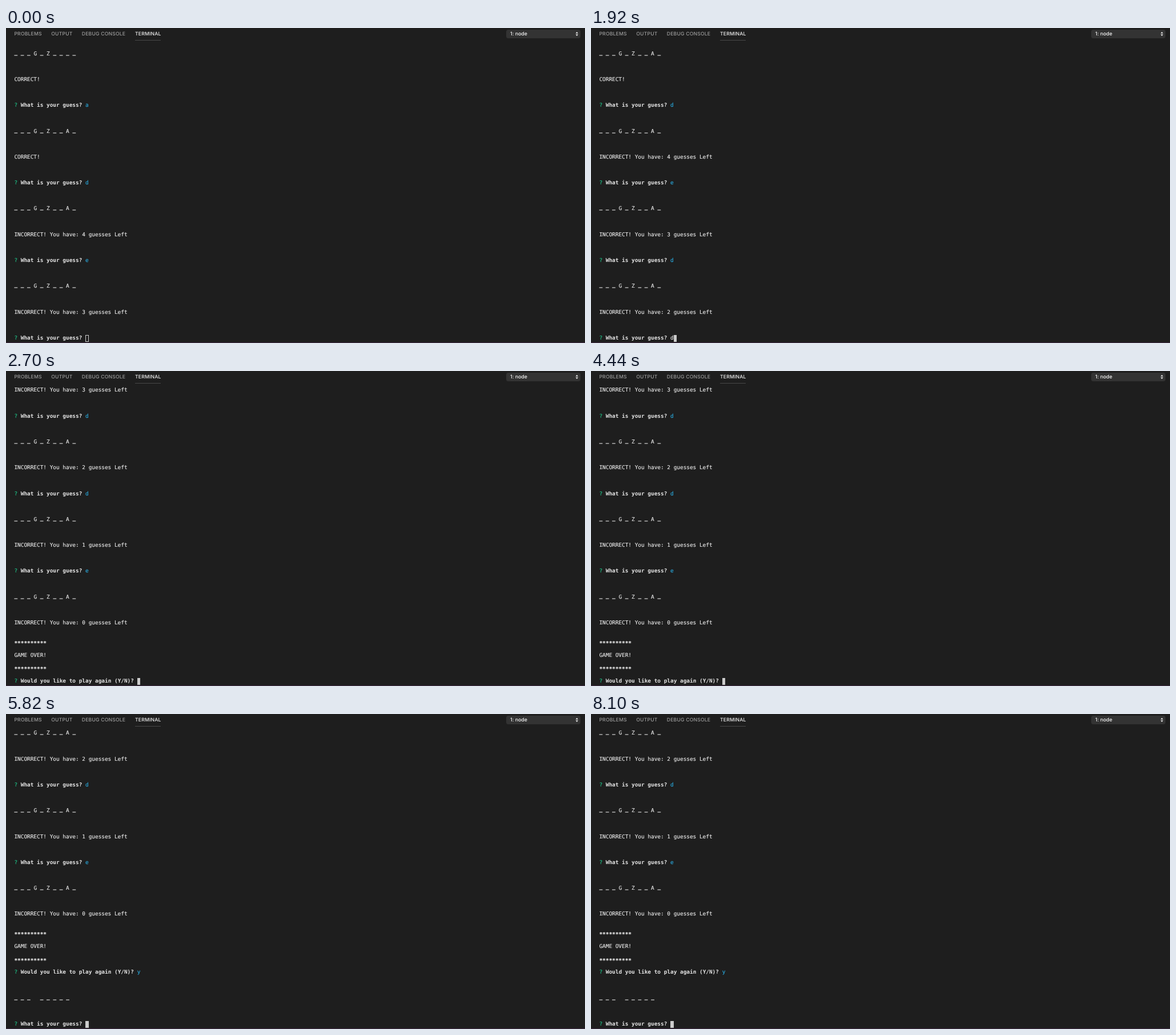
These frames come from a looping animation (1014x552 px, 8280 ms). An HTML page:

```html
<!DOCTYPE html>
<html lang="en">
<head>
<meta charset="utf-8">
<title>Terminal word game</title>
<style>
  html, body { margin: 0; width: 100%; height: 100%; overflow: hidden; background: #1e1e1e; }
  body { position: relative; text-rendering: geometricPrecision; }
  nav span, .select, .select svg, .screen, .log, .edge { position: absolute; }
  nav span, .select { font: 500 8.64px/15px Inter, "Open Sans", sans-serif; white-space: pre; }
  nav span { top: 4px; letter-spacing: .19px; color: #9c9c9c; }
  nav .active { color: #f2f2f2; }
  nav .active::after {
    content: ""; position: absolute; left: 0; top: 17px; width: 45px; height: 1px; background: #484848;
  }
  .select {
    left: 876px; top: 3px; width: 123px; height: 15px; padding-left: 7px;
    border-radius: 3.5px; background: #333; color: #f8f8f8; font-size: 8.8px;
  }
  .select svg { left: 121px; top: 3px; fill: #f0f0f0; }
  .screen { left: 14.4px; top: 28px; width: 990px; height: 522px; overflow: hidden; }
  .log {
    left: 0; bottom: .67px; white-space: pre; color: #eaeaea;
    font: 9.42px/11.3333px "DejaVu Sans Mono", "Liberation Mono", monospace;
    -webkit-text-stroke: .15px;
  }
  .log b { color: #e5e5e5; -webkit-text-stroke: 0; }
  .log i { font-style: normal; color: #1fc488; }
  .log u { text-decoration: none; color: #2aabe0; }
  .log em { position: relative; font-style: normal; }
  .log .blank { top: -2px; text-shadow: 0 0, 0 0; }
  .log .stars { top: 2px; font-weight: bold; }
  .cursor { position: absolute; box-sizing: border-box; width: 5.67px; height: 12px; background: #ccc; }
  .cursor.hollow { background: none; border: 1px solid #ccc; }
  .edge { left: 0; top: 551px; width: 100%; height: 1px; background: #3d2740; }
</style>
</head>
<body>
<nav>
  <span style="left:14.4px">PROBLEMS</span>
  <span style="left:79.3px">OUTPUT</span>
  <span style="left:132.8px">DEBUG CONSOLE</span>
  <span class="active" style="left:226px">TERMINAL</span>
</nav>
<div class="select">1: node<svg width="6" height="9"><path d="M.5 3.6 2.8 .8 5.1 3.6zM.5 5.2 2.8 8 5.1 5.2z"/></svg></div>
<div class="screen"><div class="log"></div></div>
<div class="edge"></div>
<script>
const LOOP = 8280;
const GAP = "\n\n\n\n";

const word = s => s.replaceAll("_", '<em class="blank">_</em>');
const wrong = n => `INCORRECT! You have: ${n} guesses Left`;
const ask = (question, answer) => `<i>?</i> <b>${question}</b> ${answer}`;
const entered = s => `<u>${s}</u>`;
const typing = (s = "", style = "") => `${s}<span class="cursor ${style}"></span>`;
const guess = answer => ask("What is your guess?", answer);
const again = answer => ask("Would you like to play again (Y/N)?", answer);

const known = word("_ _ _ G _ Z _ _ A _");
const miss = (letter, left) => [guess(entered(letter)), known, wrong(left)];
const stars = `<em class="stars">${"*".repeat(10)}</em>`;

const start = [
  word("_ _ _ G _ Z _ _ _ _"), "CORRECT!",
  guess(entered("a")), known, "CORRECT!",
  ...miss("d", 4), ...miss("e", 3)
];
const two = [...start, ...miss("d", 2)];
const one = [...two, ...miss("d", 1)];
const lost = [...one, ...miss("e", 0)].join(GAP) +
  `\n\n\n${stars}\n\nGAME OVER!\n\n${stars}\n\n`;

const show = (lines, prompt) => [...lines, prompt].join(GAP);

// Start time and contents of each terminal state
const states = [
  [0, show(start, guess(typing("", "hollow")))],
  [60, show(start, guess(typing()))],
  [900, show(start, guess(typing("d")))],
  [1020, show(two, guess(typing()))],
  [1860, show(two, guess(typing("d")))],
  [1980, show(one, guess(typing()))],
  [2580, show(one, guess(typing("e")))],
  [2700, lost + again(typing())],
  [4620, lost + again(typing("y"))],
  [5820, show([lost + again(entered("y")), word("_ _ _   _ _ _ _ _")], guess(typing()))]
];

const log = document.querySelector(".log");
let current;

function draw(now) {
  const time = now % LOOP;
  const state = states.findLast(([from]) => from <= time);
  if (state !== current) {
    current = state;
    log.innerHTML = state[1];
  }
}

const origin = performance.now();
function tick() {
  draw(performance.now() - origin);
  requestAnimationFrame(tick);
}
tick();
</script>
</body>
</html>
```
